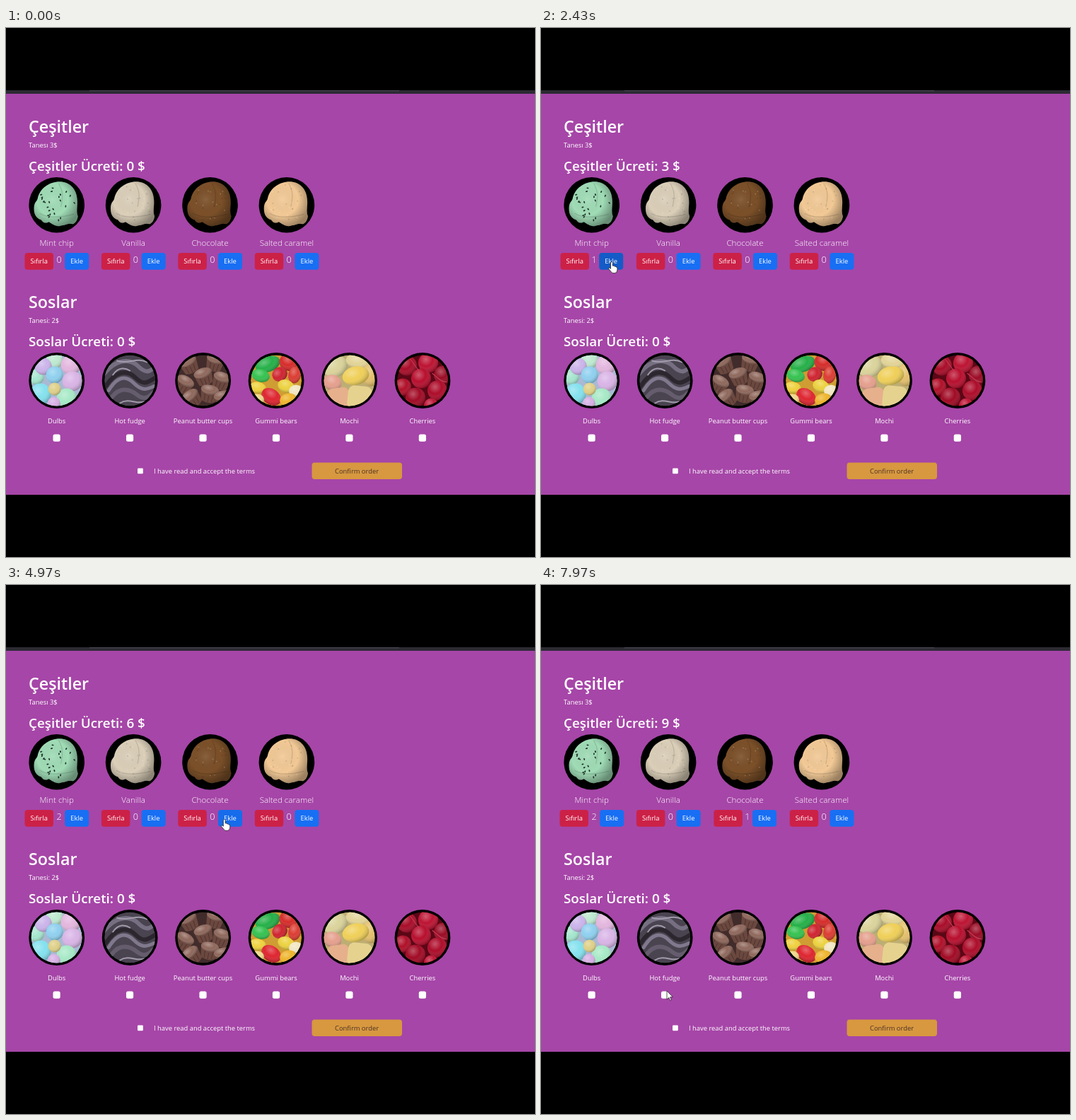
Recreate the animation shown at these times as an HTML page. Size 748 px wide and 748 px high, loop 8000 ms.

```html
<!DOCTYPE html>
<html lang="tr">
<head>
<meta charset="utf-8">
<title>Çeşitler</title>
<style>
  html, body { margin: 0; height: 100%; overflow: hidden; background: #000; }
  svg { display: block; width: 100vw; height: 100vh; }
  text { font-family: "Open Sans", "Noto Sans", sans-serif; font-size: 9.4px; fill: #fff; }
  .title { font-size: 23.3px; font-weight: 600; }
  .price { font-size: 18.85px; font-weight: 600; }
  .name { font-size: 11.6px; font-weight: 300; }
  .count { font-size: 12.6px; font-weight: 300; }
  .mid { text-anchor: middle; }
</style>
</head>
<body>
<svg id="stage" viewBox="0 0 748 748"></svg>
<script>
const LOOP = 8000;
const stage = document.getElementById('stage');

const flavours = [
  ['Mint chip', '#a0dcb6'], ['Vanilla', '#dbcfb9'],
  ['Chocolate', '#7b5029'], ['Salted caramel', '#f2c996']
];
const flavourX = i => 71.7 + 108.4 * i;
const toppingX = i => 71.7 + 103.45 * i;

let seed = 7;
const random = () => (seed = seed * 16807 % 2147483647) / 2147483647;

const label = (x, y, text, cls = '', attrs = '') =>
  `<text x="${x}" y="${y}" class="${cls}" ${attrs}>${text}</text>`;
const box = (x, y, w, h, fill, rx = 0, attrs = '') =>
  `<rect x="${x}" y="${y}" width="${w}" height="${h}" rx="${rx}" fill="${fill}" ${attrs}/>`;
const path = (d, fill, attrs = '') => `<path d="${d}" fill="${fill}" ${attrs}/>`;
const line = (d, color, width) =>
  path(d, 'none', `stroke="${color}" stroke-width="${width}" stroke-linecap="round"`);
const oval = (x, y, rx, ry, fill, turn = 0) =>
  [fill, 'url(#gloss)'].map(f =>
    `<ellipse rx="${rx}" ry="${ry}" fill="${f}" transform="translate(${x} ${y}) rotate(${turn})"/>`).join('');
const ball = (x, y, r, fill) => oval(x, y, r, r, fill);

const SCOOP = 'M-32 2C-31-5-28-5-27-9C-24-24-10-33 4-33C18-33 28-23 29-8C30 2 27 8 30 16' +
  'C29 22 27 25 23 27C17 25 14 28 7 29C0 32-6 27-11 24C-17 27-20 24-22 21C-29 19-33 13-32 2Z';

function scoop(i) {
  let art = path(SCOOP, flavours[i][1]) + path(SCOOP, 'url(#shade)') +
    line('M3-30C9-20 9-12 6 2M-24 12C-14 18 4 18 24 13', '#0002', 1.2);
  const mint = i === 0;
  for (let n = 0; n < 24; n++) {
    const a = random() * 6.283, r = Math.sqrt(random()) * 26, turn = random() * 180;
    const fill = mint ? '#1d2f27' : n % 2 ? '#0002' : '#fff3';
    art += `<ellipse rx="${mint ? 1.6 : 1}" ry=".9" fill="${fill}" transform="translate(${Math.cos(a) * r} ${Math.sin(a) * r - 3}) rotate(${turn})"/>`;
  }
  return `<g transform="translate(${flavourX(i)} 250.3)"><circle r="39.3"/>${art}</g>`;
}

const cup = (x, y, turn) => `<g transform="translate(${x} ${y}) rotate(${turn})">` +
  path('M-13-5L-10 11Q0 16 10 11L13-5Z', '#6b483f') +
  line('M-6 2L-5 11M0 4V13M6 2L5 11', '#503330', 1) + oval(0, -5, 13, 7, '#8f685c') + '</g>';

const toppings = [
  ['Dulbs', '#a9b9d4', () =>
    ball(-29, -5, 11, '#a4e6cd') + ball(-3, -29, 12, '#bde9cf') + ball(-19, -20, 12, '#cbb4ea') +
    ball(20, -22, 14, '#e3b6de') + ball(-3, -8, 12, '#8fd0ef') + ball(22, 1, 14, '#d9b4e6') +
    ball(-23, 19, 15, '#83e1ee') + ball(14, 25, 14, '#a6e9c6') + ball(-3, 12, 9, '#dfd088') +
    ball(-4, 32, 9, '#d6b0e4')],
  ['Hot fudge', '#4a4350', () =>
    line('M-36-10C-20-30 0-32 12-20S30-14 36-20', '#766f82', 6) +
    line('M-34 8C-20-14-4-16 8-4S26 2 36-4', '#2c262f', 6) +
    line('M-30 14C-18-6-6-8 6 4S26 12 34 8', '#80798d', 5) +
    line('M-26 24C-14 8 0 12 10 20S26 24 32 18', '#655d6d', 6) +
    line('M-18-28C-4-22 10-34 24-26M-14 32C-2 24 10 34 20 30M-24-8C-16-20-6-18 0-14', '#a09aab', 2)],
  ['Peanut butter cups', '#412c2b', () =>
    cup(-20, -23, -25) + cup(17, -26, 15) + cup(-27, 5, 30) + cup(1, -6, -18) +
    cup(26, 0, 20) + cup(-16, 25, -35) + cup(9, 18, 12) + cup(29, 26, -10)],
  ['Gummi bears', '#cf9d33', () =>
    oval(-12, -23, 18, 11, '#25b048', -20) + oval(-22, -7, 13, 9, '#35c250', 15) +
    oval(17, -25, 13, 11, '#d62d2b', 25) + oval(26, -8, 9, 12, '#dc3d33', 10) +
    oval(5, -9, 11, 10, '#cf2430', -30) + oval(-26, 10, 12, 8, '#efd13e', 10) +
    oval(14, 8, 12, 9, '#ecd23f', 20) + oval(28, 15, 10, 9, '#f1e6c0') +
    oval(-7, 23, 15, 11, '#de2530', 35) + oval(17, 27, 12, 9, '#eeb52d', -10) +
    oval(-27, 27, 10, 8, '#f0d98b')],
  ['Mochi', '#bdae74', () =>
    oval(-20, -20, 18, 15, '#dad39a', -20) + oval(13, -27, 18, 11, '#e2d497', 10) +
    oval(30, -8, 12, 16, '#e3bf6c') + oval(-24, 3, 13, 11, '#e59f8d', 20) +
    oval(9, -7, 19, 13, '#efcf58', -12) +
    box(-34, 8, 31, 32, '#e6b08c', 8, 'transform="rotate(-8)"') +
    box(0, 6, 34, 34, '#e6d28f', 9, 'transform="rotate(6)"')],
  ['Cherries', '#5b0716', () =>
    ball(-22, -21, 14, '#a90d29') + ball(8, -25, 14, '#bd1433') + ball(29, -8, 13, '#9a0c25') +
    ball(-28, 9, 12, '#b01029') + ball(-2, -3, 14, '#b80f2e') + ball(21, 14, 14, '#ad0d2a') +
    ball(-10, 24, 14, '#a10b25') + ball(12, 35, 10, '#be1736') +
    line('M-20-34C-8-18-6-14-2-10M14-10C22-4 26 2 34 2', '#c53a55', 1.2)]
];

function topping([name, base, draw], i) {
  const x = toppingX(i);
  return `<g transform="translate(${x} 498.5)"><circle r="39.4"/><g clip-path="url(#lens)">` +
    `<circle r="36" fill="${base}"/>${draw()}</g></g>` +
    label(x, 559, name, 'mid') + box(x - 5.2, 574.5, 10.2, 10.2, '#fff', 2.5);
}

const button = (id, x, w, fill, text) => `<g id="${id}">` + box(x, 318, w, 23.8, fill, 4) +
  box(x, 318, w, 23.8, '#000', 4, 'class="dark" opacity="0"') +
  label(x + w / 2, 333.4, text, 'mid') + '</g>';

function flavour([name], i) {
  const x = flavourX(i);
  return scoop(i) + label(x, 308.4, name, 'name mid') +
    button('reset' + i, x - 45.2, 40.5, '#cc2147', 'Sıfırla') +
    label(x + 3.3, 332.4, '0', 'count mid', `id="count${i}"`) +
    button('add' + i, x + 11.5, 34, '#186ff3', 'Ekle');
}

stage.innerHTML = `<defs>
  <clipPath id="lens"><circle r="36"/></clipPath>
  <radialGradient id="gloss" cx=".38" cy=".32" r=".7">
    <stop offset="0" stop-color="#fff" stop-opacity=".3"/>
    <stop offset=".5" stop-color="#fff" stop-opacity="0"/>
    <stop offset="1" stop-color="#000" stop-opacity=".26"/>
  </radialGradient>
  <radialGradient id="shade" cx=".42" cy=".4" r=".65">
    <stop offset="0" stop-color="#fff" stop-opacity=".1"/>
    <stop offset=".55" stop-color="#000" stop-opacity="0"/>
    <stop offset="1" stop-color="#000" stop-opacity=".36"/>
  </radialGradient></defs>` +
  box(0, 0, 748, 748, '#000') + box(0, 88, 748, 572, '#a646a8') +
  box(0, 88, 748, 5, '#2c2a33') + box(118, 88, 438, 1.4, '#45434d') +
  label(32, 147.8, 'Çeşitler', 'title') + label(32, 169, 'Tanesı 3$') +
  label(32, 202, '', 'price', 'id="total"') + flavours.map(flavour).join('') +
  label(32, 396, 'Soslar', 'title') + label(32, 417.2, 'Tanesi: 2$') +
  label(32, 450.4, 'Soslar Ücreti: 0 $', 'price') + toppings.map(topping).join('') +
  box(186, 622.4, 7.8, 7.8, '#fff', 1.2) + label(209, 630.4, 'I have read and accept the terms') +
  box(432.5, 614.5, 127.5, 23.6, '#d7983f', 4) +
  label(496, 630.2, 'Confirm order', 'mid', 'style="fill:#4d3228"') +
  '<g id="cursor" fill="#fff" stroke="#111" stroke-width=".7" stroke-linejoin="round">' +
  '<path id="hand" d="M-1.5 9.5V1a1.4 1.4 0 0 1 2.8 0V5.2q2.4-.6 2.6.9 2-.4 2.3 1 1.7-.2 1.7 1.5V11q0 4-3.4 4.6H2Q.3 15.6-1 13.4L-4.6 9.2q.2-1.9 2-.9Z"/>' +
  '<path id="arrow" d="M0 0V12L2.8 9.4 4.6 13.4 6.4 12.6 4.6 8.7H8.4Z"/></g>' +
  box(0, 0, 748, 88, '#000');

// time, x, y of the pointer
const route = [
  [0, 150, 60], [350, 150, 60], [800, 100, 331], [1300, 100, 331], [1650, 46, 332],
  [1950, 46, 332], [2200, 100, 331], [3066, 100, 331], [3351, 208, 331], [4100, 208, 331],
  [4380, 155, 331], [4700, 155, 331], [4840, 275, 350], [5000, 312, 330], [5280, 312, 330],
  [5540, 425, 331], [6680, 425, 329], [6900, 372, 329], [7200, 372, 330], [7960, 178, 574],
  [LOOP, 178, 574]
];

// time, flavour, amount added (0 resets)
const clicks = [
  [900, 0, 1], [1850, 0, 0], [2300, 0, 1], [2620, 0, 1], [3620, 1, 1], [4480, 1, 0], [5180, 2, 1],
  ...Array.from({ length: 6 }, (_, n) => [5640 + 180 * n, 3, 1]), [7080, 3, 0]
];

const find = id => document.getElementById(id);
const cursor = find('cursor'), hand = find('hand'), arrow = find('arrow'), total = find('total');
const buttons = flavours.flatMap((_, i) => [
  { el: find('reset' + i), i, side: 1, from: flavourX(i) - 45.2, to: flavourX(i) - 4.7 },
  { el: find('add' + i), i, side: -1, from: flavourX(i) + 11.5, to: flavourX(i) + 45.5 }
]);
const counters = flavours.map((_, i) => find('count' + i));
const smooth = u => u * u * (3 - 2 * u);

function pointer(t) {
  const n = Math.max(1, route.findIndex(p => p[0] >= t));
  const [t0, x0, y0] = route[n - 1], [t1, x1, y1] = route[n];
  const s = smooth((t - t0) / (t1 - t0));
  return [x0 + (x1 - x0) * s, y0 + (y1 - y0) * s];
}

const over = (b, [x, y]) => x >= b.from && x <= b.to && y >= 318 && y <= 341.8;

function render(t) {
  const counts = [0, 0, 0, 0];
  for (const [at, i, add] of clicks) if (at <= t) counts[i] = add ? counts[i] + add : 0;
  total.textContent = `Çeşitler Ücreti: ${3 * counts.reduce((a, b) => a + b)} $`;
  counts.forEach((c, i) => counters[i].textContent = c);

  // hover fades over 150 ms: share of the recent past spent above the button
  const recent = Array.from({ length: 15 }, (_, k) => pointer(Math.max(0, t - k * 10)));
  for (const b of buttons) {
    const share = recent.filter(p => over(b, p)).length / recent.length;
    b.el.querySelector('.dark').setAttribute('opacity', 0.18 * smooth(share));
    b.el.setAttribute('transform', `translate(${counts[b.i] === 1 ? b.side : 0} 0)`);
  }

  const here = recent[0], pointing = buttons.some(b => over(b, here));
  cursor.setAttribute('transform', `translate(${here})`);
  hand.style.display = pointing ? '' : 'none';
  arrow.style.display = pointing ? 'none' : '';
}

const start = performance.now();
function tick() {
  render((performance.now() - start) % LOOP);
  requestAnimationFrame(tick);
}
tick();
</script>
</body>
</html>
```
